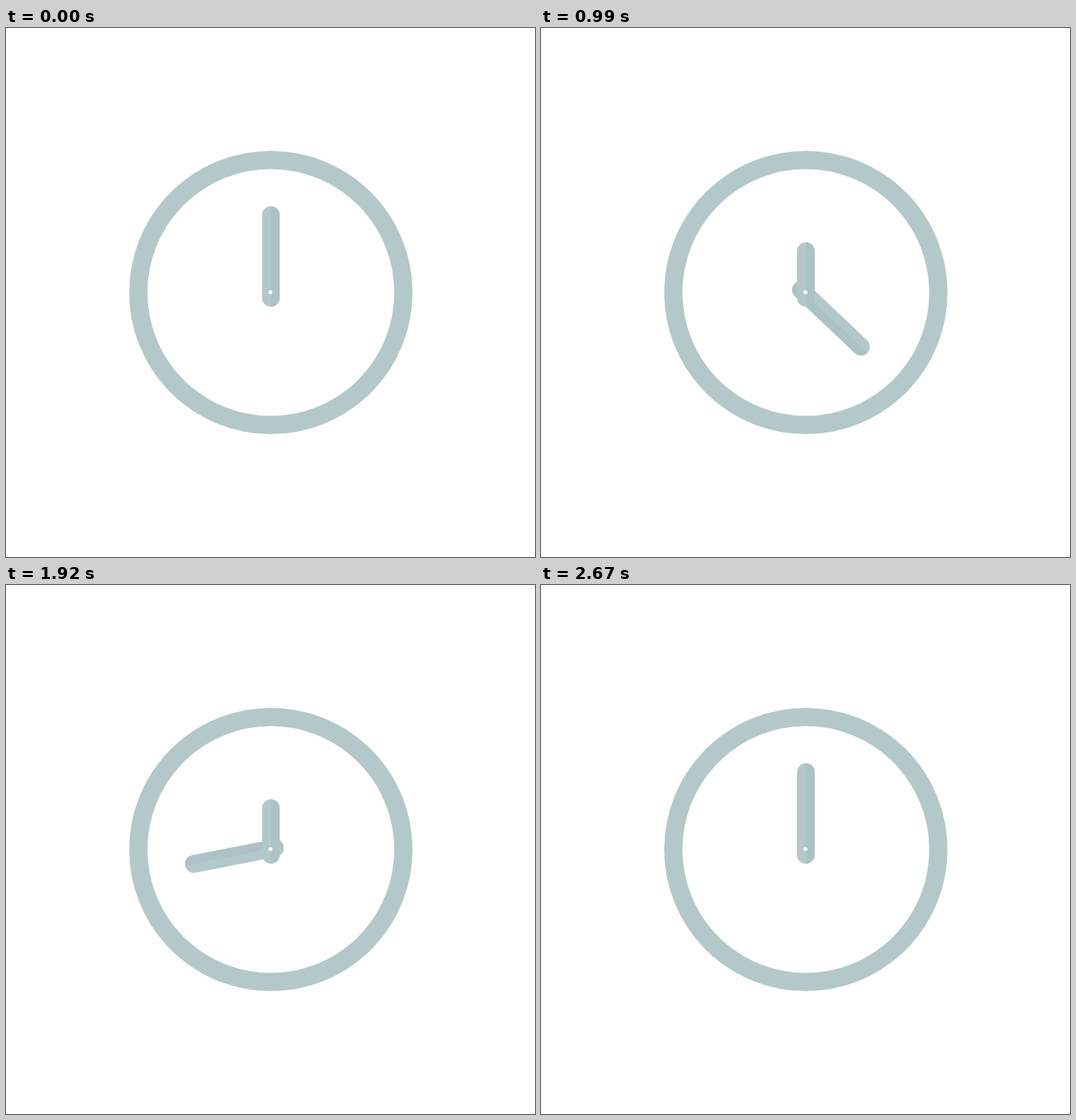
Write an HTML page that moves like this. It is 748 by 748 pixels and loops after 2700 ms.

```html
<!DOCTYPE html>
<html lang="en">
<head>
<meta charset="utf-8">
<title>Clock</title>
<style>
  html, body { margin: 0; width: 100%; height: 100%; overflow: hidden; background: #fefefe; }
  svg { display: block; width: 100%; height: 100%; }
  .light { fill: #b3c8cb; }
  .dark { fill: #acc2c6; }
</style>
</head>
<body>
<svg viewBox="0 0 748 748">
  <circle cx="374.5" cy="374" r="187.4" fill="none" stroke="#b4c8ca" stroke-width="25.8"/>
  <g id="minute">
    <rect class="light" x="362" y="252" width="25" height="142" rx="12.5"/>
    <path class="dark" d="M374.5 252a12.5 12.5 0 0 1 12.5 12.5v117a12.5 12.5 0 0 1-12.5 12.5z"/>
  </g>
  <g id="hour">
    <rect class="light" x="362" y="303" width="25" height="91" rx="12.5"/>
    <path class="dark" d="M374.5 303a12.5 12.5 0 0 1 12.5 12.5v66a12.5 12.5 0 0 1-12.5 12.5z"/>
  </g>
  <circle cx="373.9" cy="373.4" r="2.7" fill="#fefefe"/>
</svg>
<script>
  const LOOP = 2700, STEP = 30;
  const lastStep = LOOP / STEP - 1;
  const minute = document.getElementById('minute');
  const start = performance.now();

  function draw(now) {
    const step = Math.floor((Math.max(0, now - start) % LOOP) / STEP);
    minute.setAttribute('transform', `rotate(${step / lastStep * 360} 373.5 374.3)`);
    requestAnimationFrame(draw);
  }
  draw(start);
</script>
</body>
</html>
```
